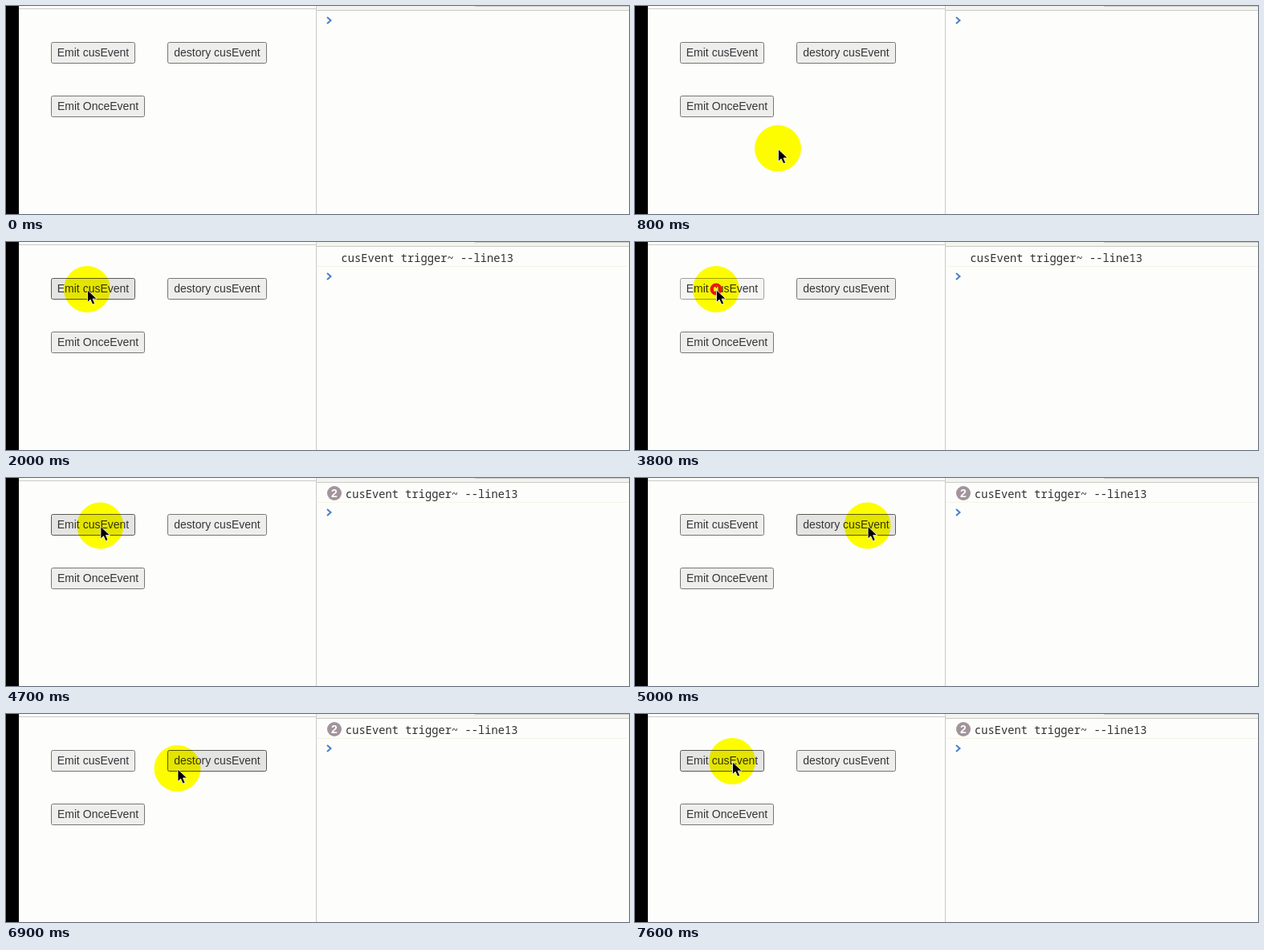
An HTML page that plays this animation: 776x260 px, repeating every 8000 ms.

```html
<!DOCTYPE html>
<html lang="en">
<head>
<meta charset="utf-8">
<title>Event emitter demo</title>
<style>
  html, body { margin: 0; width: 100%; height: 100%; overflow: hidden; background: #fdfdfb; }
  svg { display: block; width: 776px; height: 260px; }
  .label { font: 14px "Liberation Sans", Arial, sans-serif; fill: #35353a; text-anchor: middle; }
  .log { font: 13.75px "Noto Sans Mono", "DejaVu Sans Mono", monospace; fill: #303030; }
  .count { font: bold 14px "Liberation Sans", Arial, sans-serif; fill: #fff; text-anchor: middle; }
  .btn rect { fill: #eeeeec; stroke: #767674; }
  .btn.hover rect { fill: #e4e4e2; stroke: #585856; }
  .btn.down rect { fill: #f5f5f3; stroke: #a0a09e; }
  .line { fill: #cacac6; }
  #halo { fill: #ff0; mix-blend-mode: multiply; }
</style>
</head>
<body>
<svg viewBox="0 0 776 260">
  <rect width="776" height="260" fill="#fdfdfb"/>
  <rect width="16" height="260" fill="#000"/>
  <rect class="line" x="16" y="3" width="370" height="1"/>
  <rect x="387" width="389" height="5" fill="#f3f3ef"/>
  <rect class="line" x="584" width="192" height="1"/>
  <rect class="line" x="387" y="5" width="389" height="1"/>
  <rect class="line" x="386" width="1" height="260"/>

  <g id="buttons"></g>

  <g id="row">
    <rect x="387" y="30" width="389" height="1" fill="#f4f4e6"/>
    <g id="badge">
      <circle cx="409" cy="19" r="9" fill="#a2949c"/>
      <text class="count" x="409" y="24">2</text>
    </g>
    <text id="log" class="log" y="25">cusEvent trigger~ --line13</text>
  </g>
  <path id="prompt" d="M400 14l4.5 4-4.5 4" fill="none" stroke="#4a7dcb" stroke-width="2"/>

  <circle id="halo" r="29"/>
  <g id="pointer">
    <circle id="ring" fill="none" stroke="#f01414" stroke-width="4"/>
    <path d="M.5 1v15.5l3.6-3.4 2.7 6 2.8-1.2-2.6-5.9h5z"
          fill="#000" stroke="#fff" stroke-width=".8"/>
  </g>
</svg>
<script>
const LOOP = 8000, STEP = 100, ENTER = 800, REST_Y = 59;
const $ = id => document.getElementById(id);

const buttons = [
  { x: 56, y: 45, w: 105, text: 'Emit cusEvent' },
  { x: 201, y: 45, w: 124, text: 'destory cusEvent' },
  { x: 56, y: 112, w: 117, text: 'Emit OnceEvent' }
];

const clicks = [
  { at: 1700, hold: 200 }, { at: 3800, hold: 100 },
  { at: 5700, hold: 100 }, { at: 7400, hold: 100 }
];

for (const b of buttons) {
  $('buttons').insertAdjacentHTML('beforeend',
    `<g class="btn"><rect x="${b.x + .5}" y="${b.y + .5}" width="${b.w - 1}" height="26" rx="2"/>` +
    `<text class="label" x="${b.x + b.w / 2}" y="${b.y + 18}">${b.text}</text></g>`);
  b.el = $('buttons').lastElementChild;
}

const span = (t, from, to) => Math.min(1, Math.max(0, (t - from) / (to - from)));
const easeInOut = k => k < .5 ? 2 * k * k : 1 - 2 * (1 - k) ** 2;

// The pointer flies in, then sweeps right and back, dipping slightly on the way.
function pointerAt(t) {
  const left = 1 - span(t, ENTER, 1400);
  const go = easeInOut(span(t, 4600, 5100));
  const back = easeInOut(span(t, 6700, 7100));
  const dip = 9 * Math.sin(Math.PI * (go - back)) ** 2;
  return [
    101 + 77 * left ** 6 + 205 * go - 185 * back,
    REST_Y + 119 * left ** 3 + dip
  ];
}

const show = (id, on) => { $(id).style.display = on ? '' : 'none'; };
const move = (id, x, y) => $(id).setAttribute('transform', `translate(${x} ${y})`);

function draw(time) {
  const t = Math.floor(time % LOOP / STEP) * STEP;
  const visible = t >= ENTER;
  const [x, y] = pointerAt(t);
  const click = clicks.find(c => t >= c.at && t < c.at + c.hold + STEP);
  const pressed = click && t < click.at + click.hold;

  for (const b of buttons) {
    const over = visible && x >= b.x && x < b.x + b.w && y >= b.y && y < b.y + 27;
    b.el.setAttribute('class', 'btn' + (over ? pressed ? ' down' : ' hover' : ''));
  }

  const count = clicks.slice(0, 2).filter(c => t >= c.at + c.hold).length;
  show('row', count > 0);
  show('badge', count > 1);
  $('log').setAttribute('x', count > 1 ? 423 : 417.5);
  move('prompt', 0, count ? 25 : 0);

  for (const id of ['halo', 'pointer']) {
    show(id, visible);
    move(id, x, y);
  }
  show('ring', click);
  $('ring').setAttribute('r', pressed ? 5.5 : 8);
}

const start = performance.now();
function tick() {
  draw(performance.now() - start);
  requestAnimationFrame(tick);
}
tick();
</script>
</body>
</html>
```
